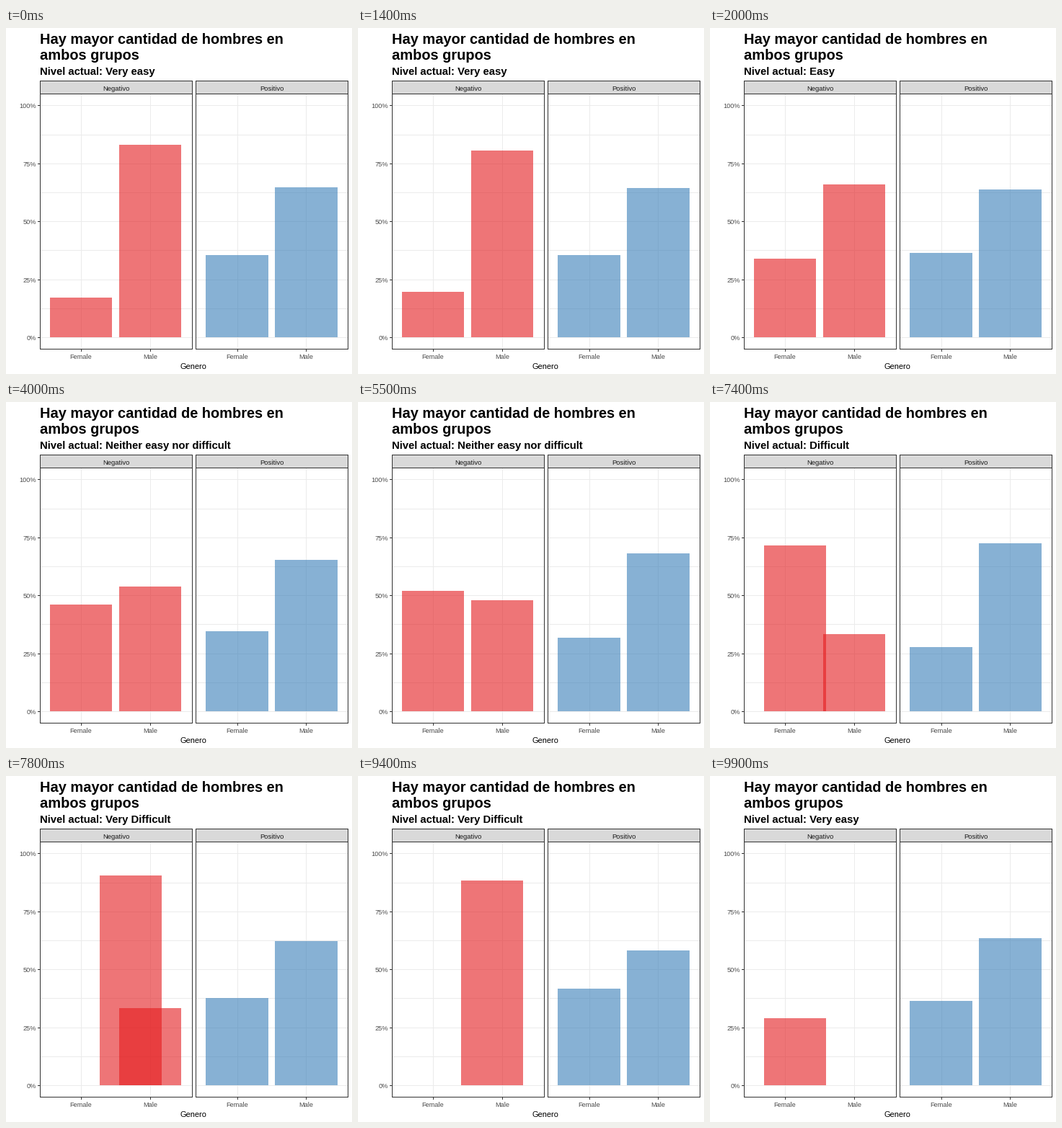
Write a matplotlib script that moves like this. It is 480 by 480 pixels and loops after 10 s.

```python
import math

import matplotlib.pyplot as plt
from matplotlib.animation import FuncAnimation
from matplotlib.patches import Rectangle

SIZE, DPI = 480, 100
FRAMES, INTERVAL = 100, 100
STEP, HOLD, MOVE = 20, 13, 7  # frames per level, still part, moving part

ZERO, SPAN = 429.6, 321.8     # y of 0 % and height of 100 %
PANEL_X, PANEL_W = (47.15, 263.58), 210.92
UNIT = PANEL_W / 2.2
TOP, BOTTOM, STRIP = 91, 445, 73

RED, BLUE = "#E41A1C", "#377EB8"
GRID, DARK, AXIS_TEXT = "#EBEBEB", "#333333", "#4D4D4D"

LEVELS = ["Very easy", "Easy", "Neither easy nor difficult",
          "Difficult", "Very Difficult"]
# First red bar: category and share; the second one is missing at the last level.
RED_CAT = [0, 0, 0, 0, 1]
RED_FIRST = [7 / 41, 0.34, 6 / 13, 2 / 3, 1.0]
RED_SECOND = [34 / 41, 0.66, 7 / 13, 1 / 3, None]
BLUE_FIRST = [11 / 31, 4 / 11, 9 / 26, 1 / 4, 3 / 7]

plt.rcParams["font.family"] = "Liberation Sans"
fig = plt.figure(figsize=(SIZE / DPI, SIZE / DPI), dpi=DPI, facecolor="white")
ax = fig.add_axes([0, 0, 1, 1])
ax.set_xlim(0, SIZE)
ax.set_ylim(SIZE, 0)
ax.axis("off")


def box(x0, y0, x1, y1, color, z=1, alpha=1):
    patch = Rectangle((x0, y0), x1 - x0, y1 - y0, facecolor=color, alpha=alpha,
                      linewidth=0, antialiased=False, zorder=z)
    return ax.add_patch(patch)


def outline(x0, y0, x1, y1):
    """One-pixel frame through the given outermost pixels."""
    box(x0, y0, x1 + 1, y0 + 1, DARK, 5)
    box(x0, y1, x1 + 1, y1 + 1, DARK, 5)
    box(x0, y0, x0 + 1, y1 + 1, DARK, 5)
    box(x1, y0, x1 + 1, y1 + 1, DARK, 5)


def label(x, y, text, px, color="black", ha="center", weight="normal"):
    return ax.text(x, y, text, fontsize=px * 72 / DPI, color=color, ha=ha,
                   va="baseline", fontweight=weight, zorder=6)


def level_y(share):
    return math.floor(ZERO - SPAN * share)


def cat_x(panel, cat):
    return PANEL_X[panel] + UNIT * (0.6 + cat)


def place(bar, panel, cat, share):
    mid = cat_x(panel, cat)
    left, right = math.floor(mid - 0.45 * UNIT), math.floor(mid + 0.45 * UNIT)
    top = level_y(share)
    bar.set_bounds(left, top, right - left, level_y(0) - top)


def draw_panel(panel, name):
    x0 = math.floor(PANEL_X[panel])
    x1 = math.floor(PANEL_X[panel] + PANEL_W)
    box(x0, STRIP, x1 + 1, TOP, "#D9D9D9")
    for i in range(9):
        y = level_y(i / 8)
        box(x0, y, x1, y + 1, GRID)
    for cat, text in enumerate(["Female", "Male"]):
        x = math.floor(cat_x(panel, cat))
        box(x, TOP, x + 1, BOTTOM, GRID)
        box(x, BOTTOM, x + 1, BOTTOM + 4, DARK)
        label(x, 459, text, 9.3, AXIS_TEXT)
    outline(x0, STRIP, x1, TOP)
    outline(x0, TOP, x1, BOTTOM)
    label((x0 + x1) / 2, 87, name, 9.5, "#1A1A1A")


draw_panel(0, "Negativo")
draw_panel(1, "Positivo")
for pct in range(0, 101, 25):
    y = level_y(pct / 100)
    box(44, y, 47, y + 1, DARK)
    label(42, y + 4, f"{pct}%", 9.1, AXIS_TEXT, "right")
label(260, 473, "Genero", 11)
label(47, 22, "Hay mayor cantidad de hombres en", 20, ha="left", weight="bold")
label(47, 44, "ambos grupos", 20, ha="left", weight="bold")
subtitle = label(47, 65, "", 14.85, ha="left", weight="bold")

red = [box(0, 0, 0, 0, RED, 3, 0.6) for _ in range(2)]
blue = [box(0, 0, 0, 0, BLUE, 3, 0.6) for _ in range(2)]


def update(frame):
    now, phase = divmod(frame, STEP)
    nxt = (now + 1) % len(LEVELS)
    k = max(0, phase - HOLD)

    def mix(values):
        return values[now] + (values[nxt] - values[now]) * k / MOVE

    subtitle.set_text("Nivel actual: " + LEVELS[now if k <= MOVE // 2 else nxt])

    place(red[0], 0, mix(RED_CAT), mix(RED_FIRST))
    red[1].set_visible(RED_SECOND[now] is not None)
    if RED_SECOND[now] is not None:
        leaves = RED_SECOND[nxt] is None
        place(red[1], 0, 1, RED_SECOND[now] if leaves else mix(RED_SECOND))

    share = mix(BLUE_FIRST)
    place(blue[0], 1, 0, share)
    place(blue[1], 1, 1, 1 - share)
    return [subtitle, *red, *blue]


anim = FuncAnimation(fig, update, frames=FRAMES, interval=INTERVAL,
                     repeat=True, repeat_delay=0, blit=False)
plt.show()
```
